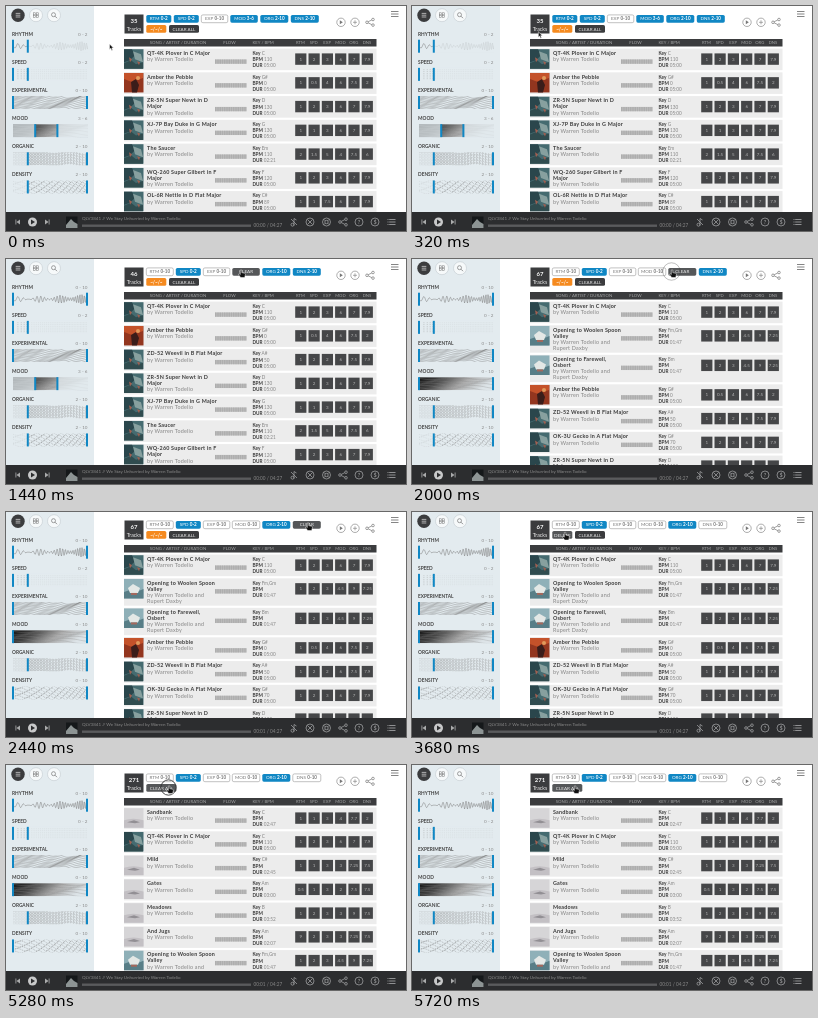
An HTML page for the animation above (6 s loop, 400 by 225 pixels).

```html
<!DOCTYPE html>
<html lang="en">
<head>
<meta charset="utf-8">
<title>Track filter</title>
<style>
html, body { margin: 0; width: 100%; height: 100%; overflow: hidden; background: #fff; }
svg { display: block; }
text { font-family: Lato, "Open Sans", sans-serif; white-space: pre; }
.b { font-weight: 700; }
.wide { letter-spacing: .2px; }
</style>
</head>
<body>
<svg id="stage" width="100%" height="100%" viewBox="0 0 400 225"><g id="base"></g><g id="live"></g></svg>
<script>
const LOOP = 6000, BLUE = '#1087c4', DARK = '#3b3c3e', SIDE = '#e3ebef';
const ARTIST = 'Warren Todelio';

// title | second title line, co-artist, key, bpm, duration, scores, cover
const SONGS = {
  plover: ['QT-4K Plover in C Major', '', 'C', 110, '05:00', [1, 2, 3, 6, 7, 7.9], 'teal'],
  pebble: ['Amber the Pebble', '', 'G#', 0, '05:00', [1, 0.5, 4, 6, 7.5, 2], 'red'],
  newt: ['ZR-5N Super Newt in D|Major', '', 'D', 130, '05:00', [1, 2, 3, 6, 7, 7.9], 'teal'],
  duke: ['XJ-7P Bay Duke in G Major', '', 'G', 130, '05:00', [1, 1, 3, 6, 7, 7.9], 'teal'],
  saucer: ['The Saucer', '', 'Em', 110, '02:21', [2, 1.5, 5, 4, 7.5, 6], 'teal'],
  gilbert: ['WQ-260 Super Gilbert in F|Major', '', 'F', 120, '05:00', [1, 2, 3, 6, 7, 7.9], 'teal'],
  nettle: ['OL-6R Nettle in D Flat Major', '', 'C#', 89, '05:00', [1, 1, 7.5, 6, 7, 7.9], 'teal'],
  weevil: ['ZD-52 Weevil in B Flat Major', '', 'A#', 50, '05:00', [1, 2, 2, 6, 7.5, 7.9], 'teal'],
  gecko: ['OK-3U Gecko in A Flat Major', '', 'G#', 70, '05:00', [1, 2, 3, 6, 7, 7.9], 'teal'],
  valley: ['Opening to Woolen Spoon|Valley', 'Rupert Daxby', 'Fm,Gm', '', '01:47', [1, 2, 3, 4.5, 9, 7.25], 'blue'],
  osbert: ['Opening to Farewell,|Osbert', 'Rupert Daxby', 'Bm', '', '01:47', [1, 2, 3, 4.5, 9, 7.25], 'blue'],
  sandbank: ['Sandbank', '', 'C', '', '02:47', [1, 1, 3, 4, 7.7, 2], 'fog'],
  mild: ['Mild', '', 'C#', '', '02:45', [1, 1, 3, 3, 7.25, 7.5], 'fog'],
  gates: ['Gates', '', 'Am', '', '03:00', [0.5, 1, 3, 2, 7.5, 7.5], 'fog'],
  meadows: ['Meadows', '', 'B', '', '03:52', [1, 2, 3, 3, 9, 7.5], 'fog'],
  jugs: ['And Jugs', '', 'Am', '', '02:07', [9, 2, 3, 3, 7.25, 7.5], 'fog'],
};
const LISTS = [
  [0, 35, 'plover pebble newt duke saucer gilbert nettle'],
  [1000, 46, 'plover pebble weevil newt duke saucer gilbert'],
  [1960, 67, 'plover valley osbert pebble weevil gecko newt'],
  [4240, 271, 'sandbank plover mild gates meadows jugs valley'],
];
const CLICKS = [940, 1840, 2230, 4120, 5260];
const PATH = [[0, 103.5, 38], [40, 103.5, 38], [640, 154, 11], [760, 156, 11], [980, 156, 11], [1240, 235, 11],
  [1860, 235, 11], [2200, 302, 11], [3320, 302, 11], [3680, 153, 20.5], [4760, 153, 20.5], [4960, 163, 21], [LOOP, 163, 21]];

const rect = (x, y, w, h, fill, extra = '') => `<rect x="${x}" y="${y}" width="${w}" height="${h}" fill="${fill}" ${extra}/>`;
const circle = (x, y, r, fill, stroke = 'none', w = .7) => `<circle cx="${x}" cy="${y}" r="${r}" fill="${fill}" stroke="${stroke}" stroke-width="${w}"/>`;
const line = (d, stroke, w = .7, dash = 'none') => `<path d="${d}" fill="none" stroke="${stroke}" stroke-width="${w}" stroke-dasharray="${dash}"/>`;
const fill = (d, color) => `<path d="${d}" fill="${color}"/>`;
const text = (x, y, size, color, s, anchor = 'start', cls = '') =>
  `<text x="${x}" y="${y}" font-size="${size}" fill="${color}" text-anchor="${anchor}" class="${cls}">${s}</text>`;
const bold = s => `<tspan class="b">${s}</tspan>`;
const at = (x, y, s) => `<g transform="translate(${x} ${y})">${s}</g>`;
const many = (n, f) => Array.from({ length: n }, (_, i) => f(i)).join('');
const ease = k => (k = Math.min(1, Math.max(0, k)), k * k * (3 - 2 * k));
const mix = (a, b, k) => a + (b - a) * k;

// slider textures, 75 by 13
const sin = Math.sin;
const curve = (f, w = .4, color = '#777', dash) =>
  line('M' + many(151, i => `${i / 2} ${f(i / 2).toFixed(2)} `), color, w, dash);
const TEXTURES = [
  curve(x => 6.5 + (1 + x / 30 + 1.5 * sin(x * .3)) * sin(x * (.9 + x / 70)), .5),
  many(38, i => line(`M${75 * (i / 38) ** .75} 1.5V12`, '#999', .5, '.8 1')),
  many(11, i => curve(x => i * 1.3 + (x / 28) * sin(x * .14 + i * .45) + .4 * sin(x * .5 + i), .4)),
  rect(0, 0, 75, 13, 'url(#mood)') + many(6, i => curve(x => 1 + i * 2.2 + 1.5 * sin(x * .13 + i), .3, '#888')),
  many(25, i => many(5, j => `<rect x="${i * 3}" y="${j * 2.7 + sin(i * .6) * i / 15}" width="${2.5 - i / 18}" height="1.9" rx="${i / 22}" fill="none" stroke="#888" stroke-width=".35"/>`)),
  many(7, i => curve(x => .8 + i * 1.9 + 1.2 * sin(x * (.3 + x / 150) + i * 1.9), .45, '#777', '1 .9')),
];
const SLIDERS = ['RHYTHM', 'SPEED', 'EXPERIMENTAL', 'MOOD', 'ORGANIC', 'DENSITY'];
const CODES = ['RTM', 'SPD', 'EXP', 'MOD', 'ORG', 'DNS'];

const COVERS = {
  teal: rect(0, 0, 19.5, 19.5, '#456b70') + fill('M0 0h8l3 6-5 5-6 2z', '#2a464c') + fill('M9 2l8 3 2 8-8-3z', '#87a09f') +
    fill('M0 14l7-3 5 4 7-2v6.5H0z', '#304c4f') + fill('M5 8l3 2-2 3zM13 12l3 1-1 3z', '#a35f50'),
  red: rect(0, 0, 19.5, 19.5, '#93361f') + fill('M0 0h19v5L8 9 0 6z', '#c4522a') + fill('M7 9l5-3 3 6-2 7.5H8z', '#3a1d1a') + circle(14, 5, 2, '#e09a5c'),
  blue: rect(0, 0, 19.5, 19.5, '#8fb0b8') + fill('M0 13l6-2 6 2 7.5-3v9.5H0z', '#587e87') + fill('M4 9l5-4 7 4-2 5H6z', '#e4e8e6') + fill('M7 14h6v2H7z', '#a4685c'),
  fog: rect(0, 0, 19.5, 19.5, '#d6d5d7') + fill('M0 12q9-3 19.5 0v7.5H0z', '#c3c0c4') + fill('M3 14l7-2 6 2-5 1z', '#928f94'),
};

const share = c => circle(-3, 0, 1.3, 'none', c) + circle(3, -2.8, 1.3, 'none', c) + circle(3, 2.8, 1.3, 'none', c) + line('M-1.8-.6 1.8-2.3M-1.8 .6 1.8 2.3', c);
const bars = (x, y, w, gap, c, dash) => line(many(3, i => `M${x} ${y + i * gap}h${w}`), c, .8, dash);

function drawBase() {
  const grey = '#a5a6a7';
  let s = '<defs><linearGradient id="mood" x2="1" y2=".25"><stop stop-color="#111"/><stop offset=".3" stop-color="#444"/><stop offset=".65" stop-color="#aaa"/><stop offset="1" stop-color="#dde4e8"/></linearGradient></defs>';
  s += rect(0, 0, 400, 225, '#fff') + rect(0, 0, 88, 206, SIDE);
  s += circle(12, 9.2, 6.7, DARK) + bars(9.7, 7.4, 4.6, 1.8, '#ccc');
  s += circle(30, 9.2, 6.5, '#f6f9fa', '#b8c1c6', .5) + many(4, i => rect(27.6 + i % 2 * 2.7, 6.8 + (i >> 1) * 2.7, 2, 2, 'none', 'stroke="#777" stroke-width=".5"'));
  s += circle(48, 9.2, 6.5, '#f6f9fa', '#b8c1c6', .5) + circle(47.5, 8.7, 2, 'none', '#666', .6) + line('M49 10.2l2 2', '#666');
  SLIDERS.forEach((name, i) => {
    const y = 33.7 + i * 28.15;
    s += text(6, y - 4, 4.8, '#444', name, 'start', 'b');
    s += `<svg x="7" y="${y}" width="75" height="13">${TEXTURES[i]}</svg>`;
  });
  s += circle(335, 16.3, 4.2, 'none', '#777', .6) + fill('M333.8 14.3l3 2-3 2z', '#777');
  s += circle(349, 16.3, 4.2, 'none', '#777', .6) + line('M349 14.3v4M347 16.3h4', '#777', .6);
  s += at(364, 16.3, share('#777')) + bars(385, 5.5, 7.5, 2.5, '#666');
  s += rect(118, 33, 252.5, 7.5, DARK);
  s += text(172, 38.2, 4.3, grey, 'SONG / ARTIST / DURATION', 'middle') + text(223.5, 38.2, 4.3, grey, 'FLOW', 'middle') + text(246.5, 38.2, 4.3, grey, 'KEY / BPM');
  CODES.forEach((c, i) => s += text(294.5 + i * 13.3, 38.2, 4.2, grey, c, 'middle'));
  return s;
}

function drawPlayer(t) {
  const c = '#aaabac';
  let s = rect(0, 206, 400, 19, '#2c2d2f');
  s += fill('M14 213.5v5l-3.5-2.5zM9.5 213.5h.8v5h-.8zM39 213.5v5l3.5-2.5zM42.7 213.5h.8v5h-.8z', c);
  s += circle(26.5, 216, 4.5, '#c8c9ca') + fill('M25 213.5l4 2.5-4 2.5z', '#2c2d2f');
  s += rect(60, 210.5, 11.5, 11.5, '#15181a') + fill('M60 219l5-6 3 3 3.5 2v4H60z', '#8d9494');
  s += text(76, 214.3, 4.5, '#8a8a8a', `QLV3841 // We Stay Unhurried by ${ARTIST}`);
  s += rect(76, 218.5, 169, 2.4, '#5a5b5d') + text(247.5, 221.3, 4.7, '#888', `00:0${t < 2400 ? 0 : 1} / 04:27`);
  s += at(288, 216, line('M0 3.5V-3.5l2.5 1.5M-3-3l6 6', c) + circle(-1.5, 2.7, 1.5, 'none', c));
  s += at(304, 216, circle(0, 0, 4, 'none', c) + line('M-2.5 2.5l5-5M-2.5-2.5l5 5', c));
  s += at(320.5, 216, circle(0, 0, 4, 'none', c) + circle(0, 0, 1.7, 'none', c) + line('M-2.8-2.8l1.6 1.6M2.8-2.8l-1.6 1.6M-2.8 2.8l1.6-1.6M2.8 2.8l-1.6-1.6', c));
  s += at(337, 216, share(c));
  s += ['?', '$'].map((g, i) => circle(353 + i * 16, 216, 4, 'none', c) + text(353 + i * 16, 218, 5.5, c, g, 'middle')).join('');
  return s + bars(381.5, 213.5, 8, 2.5, c, '1 .7 6.3');
}

function drawRow(song, y) {
  const [title, guest, key, bpm, dur, scores, cover] = song;
  const titles = title.split('|'), height = guest ? 29.5 : 23.75;
  let s = rect(118, 0, 252.5, height - 2.2, '#ececec') + at(118, .6, COVERS[cover]);
  titles.forEach((l, n) => s += text(141, 6.4 + n * 5.9, 5.4, '#3c3c3c', l, 'start', 'b wide'));
  const by = 6.8 + titles.length * 5.9;
  s += text(141, by, 5.4, '#858585', `by ${ARTIST}${guest && ' and'}`, 'start', 'wide') + text(141, by + 5.9, 5.4, '#858585', guest, 'start', 'wide');
  s += rect(209, 10.8, 31.5, 4.4, '#bbb') + line('M209 13h31.5', '#a5a5a5', 4.4, '.6 1.2');
  [['Key', key], ['BPM', bpm], ['DUR', dur]].forEach(([k, v], n) =>
    s += text(246.5, 6.4 + n * 6.1, 4.7, '#858585', `<tspan class="b" fill="#3c3c3c">${k}</tspan> ${v}`));
  scores.forEach((v, n) => s += rect(289.2 + n * 13.3, 4.8, 11.2, 11.4, '#454648') + text(294.8 + n * 13.3, 12.1, 4.5, '#b5b5b5', v, 'middle'));
  return [at(0, y, s), y + height];
}

function drawList(names) {
  let y = 42.6, s = '';
  for (const name of names.split(' ')) {
    const [row, next] = drawRow(SONGS[name], y);
    s += row;
    y = next;
  }
  return s;
}

function cursorAt(t) {
  const i = PATH.findIndex(p => p[0] > t), [t0, x0, y0] = PATH[i - 1], [t1, x1, y1] = PATH[i];
  const k = ease((t - t0) / (t1 - t0));
  return [mix(x0, x1, k), mix(y0, y1, k)];
}

function draw(t) {
  const [cx, cy] = cursorAt(t);
  const [, count, names] = LISTS.filter(l => l[0] <= t).pop();
  const open = (t0, a, b) => mix(a, b, ease((t - t0) / 140));
  const ranges = [[0, open(960, 2, 10)], [0, 2], [0, 10], [open(1860, 3, 0), open(1860, 6, 10)], [2, 10], [open(2260, 2, 0), 10]];
  let s = '', over = false;

  ranges.forEach(([a, b], i) => {
    const y = 33.7 + i * 28.15, xa = 7 + a * 7.4, xb = 7 + b * 7.4;
    s += text(81.5, y - 4, 4.6, '#888', `${Math.round(a)} - ${Math.round(b)}`, 'end');
    s += rect(7, y, xa - 7, 13, SIDE, 'opacity=".75"') + rect(xb, y, 82 - xb, 13, SIDE, 'opacity=".75"');
    s += rect(xa - 1, y, 2, 13, BLUE) + rect(xb - 1, y, 2, 13, BLUE);
  });

  s += rect(118.5, 8.5, 19, 19, DARK) + text(128, 17.2, 6, '#fff', count, 'middle', 'b') + text(128, 24.9, 5.3, '#eee', 'Tracks', 'middle');

  const tag = (x, y, w, label, color, ink, hoverLabel) => {
    const hit = cx >= x && cx <= x + w && cy >= y && cy <= y + 7.8;
    over = over || hit;
    const edge = color === '#fff' && !hit ? 'stroke="#999" stroke-width=".6"' : '';
    return rect(x, y, w, 7.8, hit ? '#555759' : color, `rx="1.6" ${edge}`) +
      text(x + w / 2, y + 5.5, 4.6, hit ? '#eee' : ink, hit ? hoverLabel : label, 'middle');
  };
  let x = 140.3;
  ranges.forEach(([a, b], i) => {
    const lo = Math.round(a), hi = Math.round(b), full = lo === 0 && hi === 10;
    const w = i < 2 ? (hi < 10 ? 25 : 27) : [26.5, 27.5, 28, 28][i - 2];
    s += tag(x, 8.9, w, `${CODES[i]} ${bold(`${lo}-${hi}`)}`, full ? '#fff' : BLUE, full ? '#777' : '#fff', 'CLEAR');
    x += w + 2.5;
  });
  const dated = t < 4240;
  if (dated) s += tag(140.3, 19, 20, bold('~/~/~'), '#f58a1f', '#fff', 'DELETE');
  s += tag(dated ? 163 : 140.3, 19, 30, 'CLEAR ALL', DARK, '#eee', 'CLEAR ALL');

  s += drawList(names) + drawPlayer(t);

  for (const c of CLICKS) {
    const k = (t - c) / 200;
    if (k >= 0 && k < 1) s += `<g opacity="${1 - k * k}">${circle(cx - .5, cy + 1.5, 7.5 + 1.5 * k, 'none', '#333', .9)}</g>`;
  }
  const shape = over
    ? 'M-.7 0q.8-.8 1.5 0v2.6l3 .7q.8.3.6 1.3l-.7 3h-4l-2.2-3q0-1 1.1-.6l.7.6z'
    : 'M0 0v5.4l1.3-1.1 .9 2.1 1-.4-.9-2.1h1.7z';
  s += at(cx, cy, `<path d="${shape}" fill="#111" stroke="#fff" stroke-width=".5"/>`);
  live.innerHTML = s;
}

const live = document.getElementById('live');
document.getElementById('base').innerHTML = drawBase();
function tick() {
  draw(performance.now() % LOOP);
  requestAnimationFrame(tick);
}
tick();
</script>
</body>
</html>
```
